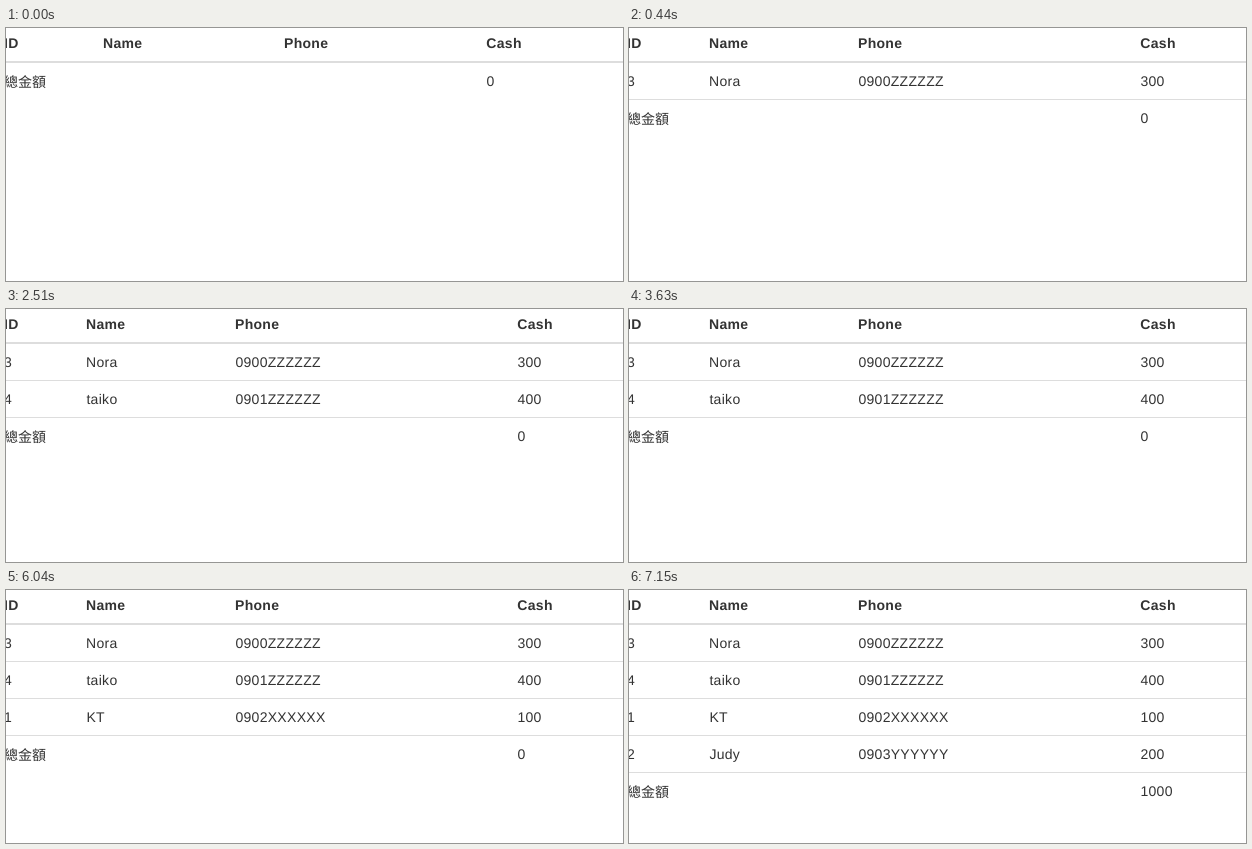
Recreate the animation shown at these times as an HTML page. Size 617 by 253 pixels, loop 8720 ms.

```html
<!DOCTYPE html>
<html lang="zh-Hant">
<head>
<meta charset="utf-8">
<title>Cash table</title>
<style>
  html, body { margin: 0; width: 100%; height: 100%; overflow: hidden; background: #fff; }
  svg { display: block; width: 617px; height: 253px; }
  text {
    font: 14px "Liberation Sans", Arial, sans-serif;
    letter-spacing: .3px;
    text-rendering: geometricPrecision;
    fill: #333;
  }
  .head text { font-weight: bold; }
  .label {
    font-family: "Noto Sans CJK TC", "Noto Sans CJK", sans-serif;
    font-weight: 300;
    letter-spacing: 0;
  }
  rect { fill: #ddd; }

  .empty, .zero, .row1, .row2, .row3, .row4, .total {
    animation: 8720ms step-end infinite;
  }
  .empty { animation-name: empty; }
  .zero  { animation-name: zero; }
  .row1  { animation-name: row1; }
  .row2  { animation-name: row2; }
  .row3  { animation-name: row3; }
  .row4  { animation-name: row4; }
  .total { animation-name: total; }

  @keyframes empty { 0% { opacity: 1 } 5.0459%, 100% { opacity: 0 } }
  @keyframes zero  { 0% { opacity: 0 } 5.0459% { opacity: 1 } 81.9954%, 100% { opacity: 0 } }
  @keyframes row1  { 0% { opacity: 0 } 5.0459%, 100% { opacity: 1 } }
  @keyframes row2  { 0% { opacity: 0 } 28.7844%, 100% { opacity: 1 } }
  @keyframes row3  { 0% { opacity: 0 } 50.1147%, 100% { opacity: 1 } }
  @keyframes row4  { 0% { opacity: 0 } 81.9954%, 100% { opacity: 1 } }
  @keyframes total {
    0% { transform: translateY(0) }
    5.0459% { transform: translateY(37px) }
    28.7844% { transform: translateY(74px) }
    50.1147% { transform: translateY(111px) }
    81.9954%, 100% { transform: translateY(148px) }
  }
</style>
</head>
<body>
<svg viewBox="0 0 617 253">
  <g class="head">
    <text x="-2" y="20">ID</text>
    <g class="empty">
      <text x="97" y="20">Name</text>
      <text x="278" y="20">Phone</text>
      <text x="480.3" y="20">Cash</text>
    </g>
    <g class="row1">
      <text x="80" y="20">Name</text>
      <text x="229" y="20">Phone</text>
      <text x="511.3" y="20">Cash</text>
    </g>
  </g>
  <rect y="33" width="617" height="2"/>

  <g class="row1">
    <text x="-2" y="58">3</text>
    <text x="80" y="58">Nora</text>
    <text x="229.4" y="58">0900ZZZZZZ</text>
    <text x="511.4" y="58">300</text>
    <rect y="71" width="617" height="1"/>
  </g>
  <g class="row2">
    <text x="-2" y="95">4</text>
    <text x="80.4" y="95">taiko</text>
    <text x="229.4" y="95">0901ZZZZZZ</text>
    <text x="511.4" y="95">400</text>
    <rect y="108" width="617" height="1"/>
  </g>
  <g class="row3">
    <text x="-2" y="132">1</text>
    <text x="80.4" y="132">KT</text>
    <text x="229.4" y="132">0902XXXXXX</text>
    <text x="511.4" y="132">100</text>
    <rect y="145" width="617" height="1"/>
  </g>
  <g class="row4">
    <text x="-2" y="169">2</text>
    <text x="80.4" y="169">Judy</text>
    <text x="229.4" y="169">0903YYYYYY</text>
    <text x="511.4" y="169">200</text>
    <rect y="182" width="617" height="1"/>
  </g>

  <g class="total">
    <text class="label" x="-2" y="59">總金額</text>
    <text class="empty" x="480.4" y="58">0</text>
    <text class="zero" x="511.4" y="58">0</text>
    <text class="row4" x="511.4" y="58">1000</text>
  </g>
</svg>
</body>
</html>
```
